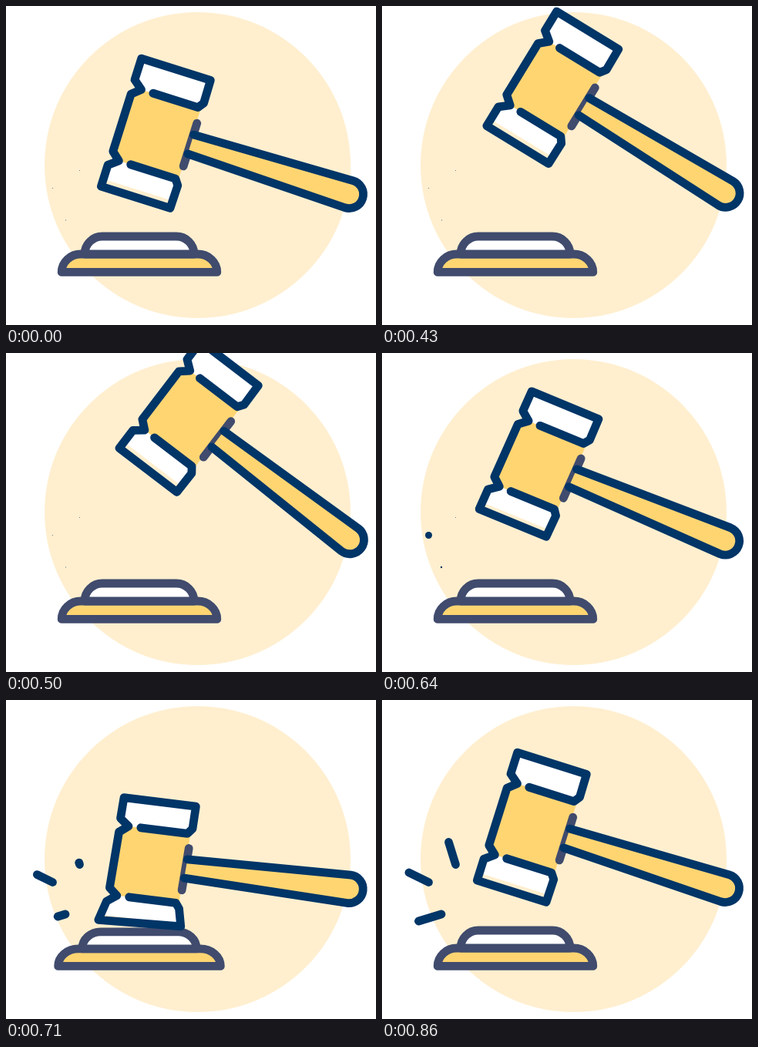
These frames come from a looping animation (480x414 px, 1.43 s). An HTML page with a canvas:

```html
<!DOCTYPE html>
<html lang="en">
<head>
<meta charset="utf-8">
<title>Gavel</title>
<style>
  html, body { margin: 0; width: 100%; height: 100%; overflow: hidden; background: #fff; }
  canvas { display: block; }
</style>
</head>
<body>
<canvas id="stage" width="480" height="414"></canvas>
<script>
const ctx = document.getElementById('stage').getContext('2d');
const NAVY = '#003567', SLATE = '#404b6d', YELLOW = '#ffd572', CREAM = '#ffefcf', WHITE = '#fff';
const LINE = 10.8;
const LOOP = 1430, START = 360, STEP = 70;

// Key moments, counted in steps
const PEAK = 3.3, HIT = 6, REST = 8;
const PEAK_ANGLE = 20.2, HIT_ANGLE = -10.4;
const PIVOT = [450.9, 246.1], TILT = 17.5;

// Sparks grow from their inner end, one after another
const sparks = [
  { from: [60.5, 236.5], to: [35, 224], start: 5.05 },
  { from: [95.5, 213.5], to: [86.5, 184.5], start: 5.9 },
  { from: [77, 278], to: [47.5, 287], start: 5.6 }
];

// Upper half of the head outline, with the handle lying level
const halfHead = [
  [-282, -48.5], [-221, -48.5], [-215.5, -56], [-216, -87],
  [-310, -87], [-310, -58], [-298, -48.5], [-309, -39]
];
const mirror = points => points.map(([x, y]) => [x, -y]).reverse();
const cap = halfHead.slice(1, 7);
const notch = halfHead.slice(6);

const ramp = (n, from, to) => Math.min(1, Math.max(0, (n - from) / (to - from)));
const mix = (a, b, u) => a + (b - a) * u;
const easeInOut = u => u < 0.5 ? 2 * u * u : 1 - 2 * (1 - u) ** 2;

function swingAt(n) {
  if (n < PEAK) return PEAK_ANGLE * easeInOut(n / PEAK);
  if (n < HIT) return mix(PEAK_ANGLE, HIT_ANGLE, ramp(n, PEAK, HIT) ** 1.5);
  return mix(HIT_ANGLE, 0, easeInOut(ramp(n, HIT, REST)));
}

function stepAt(time) {
  if (time < START) return 0;
  const hold = time < 780 ? 0 : 10; // the blow lingers a little
  return Math.min(REST, 1 + Math.floor((time - START - hold) / STEP));
}

function trace(points) {
  ctx.beginPath();
  points.forEach(([x, y]) => ctx.lineTo(x, y));
}

function fill(color) {
  ctx.fillStyle = color;
  ctx.fill();
}

function stroke(color, width = LINE) {
  ctx.strokeStyle = color;
  ctx.lineWidth = width;
  ctx.stroke();
}

function drawSlab(halfWidth, top, bottom, radius, color, impact) {
  const wide = 1 + 0.045 * impact, flat = 1 - 0.04 * impact;
  const floor = 345.4, base = floor + (bottom - floor) * flat;
  const reach = (halfWidth - radius) * wide, rx = radius * wide, ry = (bottom - top) * flat;
  ctx.beginPath();
  ctx.ellipse(173 - reach, base, rx, ry, 0, Math.PI, Math.PI * 1.5);
  ctx.ellipse(173 + reach, base, rx, ry, 0, Math.PI * 1.5, Math.PI * 2);
  ctx.closePath();
  fill(color);
  stroke(SLATE);
}

function drawSpark({ from: [x, y], to, start }, n) {
  const length = ramp(n, start, start + 1.2);
  trace([[x, y], [mix(x, to[0], length) + 0.01, mix(y, to[1], length)]]);
  stroke(NAVY, Math.max(1, LINE * ramp(n, start - 0.8, start + 0.1)));
}

function drawGavel(n, impact) {
  const squash = ramp(n, 3, HIT) * (1 - ramp(n, HIT, REST));
  const bend = ([x, y]) => [x + squash * (2.2 - 0.04 * y), y * (1 - 0.06 * squash)];
  const shape = points => trace(points.map(bend));

  ctx.save();
  ctx.translate(...PIVOT);
  ctx.rotate((TILT + swingAt(n)) * Math.PI / 180);
  ctx.translate(-6, 0);

  shape([[-217, -48.5], ...notch, ...mirror(notch), [-217, 48.5]]);
  fill(YELLOW);
  shape(cap);
  fill(WHITE);
  shape(mirror(cap).map(([x, y]) => [x, Math.min(y, 77)]));
  fill(WHITE);

  shape([[-216, -28.5], [-216, 30]]);
  stroke(SLATE);
  shape([[-215.5, -13]]);
  ctx.arc(0, 0, 18.3, -Math.PI / 2, Math.PI / 2);
  ctx.lineTo(...bend([-215.5, 13]));
  fill(YELLOW);
  stroke(NAVY);

  // The striking face spreads on impact
  const lower = mirror(halfHead).map(([x, y]) => {
    if (y < 87) return [x, y];
    return x < -300 ? [x - 6.5 * impact, y - 2 * impact] : [x + 6.5 * impact, y - 7 * impact];
  });
  shape([...halfHead, ...lower]);
  stroke(NAVY);
  ctx.restore();
}

function draw(time) {
  const n = stepAt(time);
  const impact = n < HIT ? 0 : 1 - ramp(n, HIT, REST);
  ctx.clearRect(0, 0, 480, 414);
  ctx.lineCap = ctx.lineJoin = 'round';

  ctx.beginPath();
  ctx.arc(248.5, 206.5, 198.5, 0, Math.PI * 2);
  fill(CREAM);

  drawSlab(100.8, 322, 345.4, 25, YELLOW, impact);
  drawSlab(71, 299, 322, 23, WHITE, impact);
  sparks.forEach(spark => drawSpark(spark, n));
  drawGavel(n, impact);
}

function tick() {
  draw(performance.now() % LOOP);
  requestAnimationFrame(tick);
}
tick();
</script>
</body>
</html>
```
